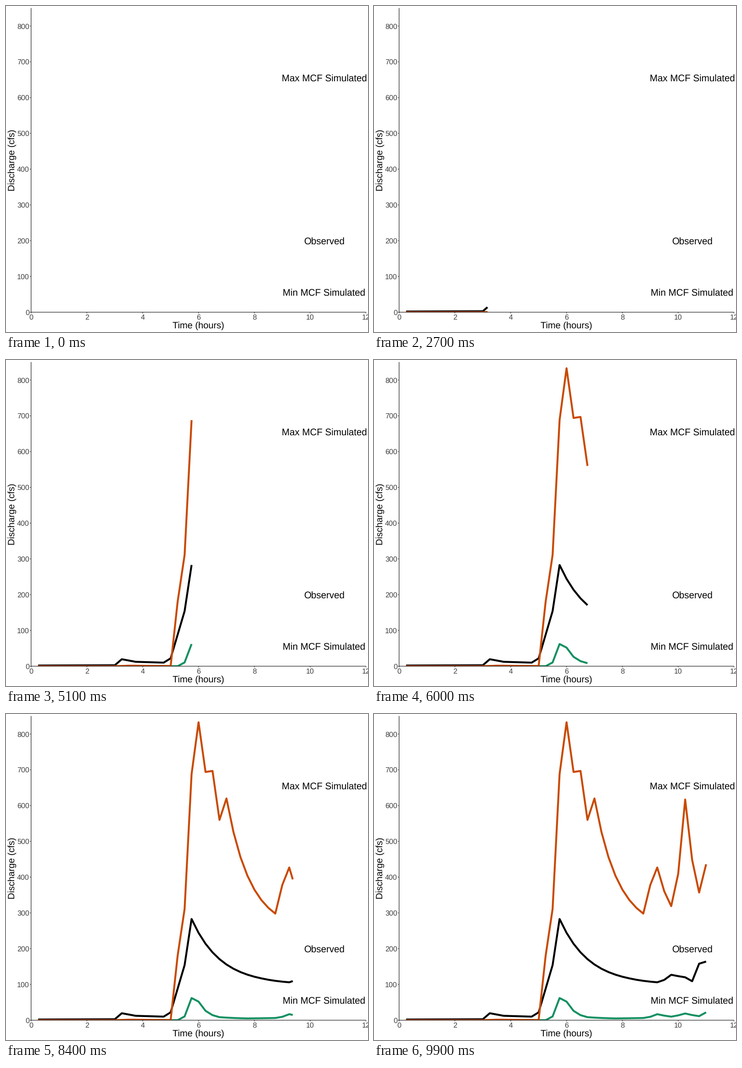
Write a matplotlib script that moves like this. It is 789x710 px and loops after 10000 ms.

```python
import matplotlib.pyplot as plt
import numpy as np
from matplotlib.animation import FuncAnimation
from matplotlib.patches import Rectangle

W, H, DPI = 789, 710, 100
FRAMES, INTERVAL = 100, 100
PT = 72 / DPI  # points per pixel

X0, Y0, TOP = 54.7, 666.9, 4.4
X_UNIT, Y_UNIT = 60.83, 0.779
RIGHT = X0 + 12 * X_UNIT

ORANGE, GREEN, BLACK = "#c94a02", "#149061", "#000000"
TICK_TEXT, TICK_LINE = "#404040", "#262626"

# Quarter-hour readings, each reached on a whole frame
hours = np.arange(1, 45) * 0.25
reading_frames = np.round(np.linspace(0, FRAMES - 1, len(hours)))


def hydrograph(rise, recession, base):
    """Linear rise, then exponential swings above a base flow."""
    t, flow = np.transpose(rise)
    late_t, late_flow = np.transpose([rise[-1]] + recession)
    swing = np.exp(np.interp(hours, late_t, np.log(late_flow - base)))
    return np.where(hours <= t[-1], np.interp(hours, t, flow), base + swing)


observed = hydrograph(
    [(0.25, 2), (3, 2.8), (3.25, 19.5), (3.75, 12.3), (4.75, 10), (5, 22),
     (5.5, 154), (5.75, 283)],
    [(8.25, 117), (9.25, 106), (9.75, 127), (10.25, 120), (10.5, 109),
     (10.75, 158), (11, 164)],
    base=100)
simulated_max = hydrograph(
    [(3, 0), (3.5, 1.5), (5, 0.5), (5.25, 180), (5.5, 311), (5.75, 688),
     (6, 833), (6.25, 694), (6.5, 697), (6.75, 560), (7, 620)],
    [(8.75, 298), (9, 378), (9.25, 427), (9.75, 319), (10.25, 617),
     (10.75, 357), (11, 436)],
    base=250)
simulated_min = hydrograph(
    [(5.25, 0), (5.5, 10.5), (5.75, 62), (6, 52)],
    [(6.75, 8.5), (7.75, 5), (8.75, 6.2), (9.25, 16.8), (9.75, 10),
     (10.25, 18.8), (10.75, 11.3), (11, 22)],
    base=3.5)


def px(hour):
    return X0 + np.asarray(hour) * X_UNIT


def py(flow):
    return Y0 - np.asarray(flow) * Y_UNIT


plt.rcParams.update({"font.family": "Liberation Sans", "text.hinting": "none"})
fig = plt.figure(figsize=(W / DPI, H / DPI), dpi=DPI, facecolor="white")
ax = fig.add_axes([0, 0, 1, 1])
ax.set_xlim(0, W)
ax.set_ylim(H, 0)
ax.axis("off")


def label(x, y, text, size, color=BLACK, ha="center", rotation=0):
    ax.text(x, y, text, fontsize=size * PT, color=color, ha=ha, va="baseline",
            rotation=rotation, rotation_mode="anchor")


def rule(xs, ys, color=BLACK):
    ax.plot(xs, ys, color=color, lw=1.07 * PT, solid_capstyle="butt",
            snap=False, zorder=5)


rule([X0, X0], [Y0, TOP])
rule([X0, RIGHT], [Y0, Y0])

for flow in range(0, 801, 100):
    y = py(flow)
    rule([X0 - 2.75, X0], [y, y], TICK_LINE)
    label(50.8, y + 5.7, str(flow), 16, TICK_TEXT, ha="right")
for hour in range(0, 13, 2):
    x = px(hour)
    rule([x, x], [Y0, Y0 + 2.75], TICK_LINE)
    label(x, 682.8, str(hour), 16, TICK_TEXT)

label((X0 + RIGHT) / 2, 702, "Time (hours)", 20)
label(19.3, (Y0 + TOP) / 2, "Discharge (cfs)", 20, rotation=90)

for flow, text in [(655, "Max MCF Simulated"), (200, "Observed"),
                   (55, "Min MCF Simulated")]:
    label(px(10.5), py(flow) + 7.2, text, 20.55)

panel = Rectangle((X0, TOP), RIGHT - X0, Y0 - TOP, transform=ax.transData)
series = []
for flows, color in [(observed, BLACK), (simulated_min, GREEN),
                     (simulated_max, ORANGE)]:
    line, = ax.plot([], [], color=color, lw=4.2 * PT, zorder=3, snap=False,
                    solid_capstyle="butt", solid_joinstyle="round")
    line.set_clip_path(panel)
    series.append((line, flows))


def draw(frame):
    done = reading_frames < frame
    now = np.interp(frame, reading_frames, hours)
    for line, flows in series:
        tip = np.interp(now, hours, flows)
        line.set_data(px(np.append(hours[done], now)),
                      py(np.append(flows[done], tip)))
    return [line for line, _ in series]


anim = FuncAnimation(fig, draw, frames=FRAMES, interval=INTERVAL,
                     repeat=True, repeat_delay=0, blit=False)
plt.show()
```
